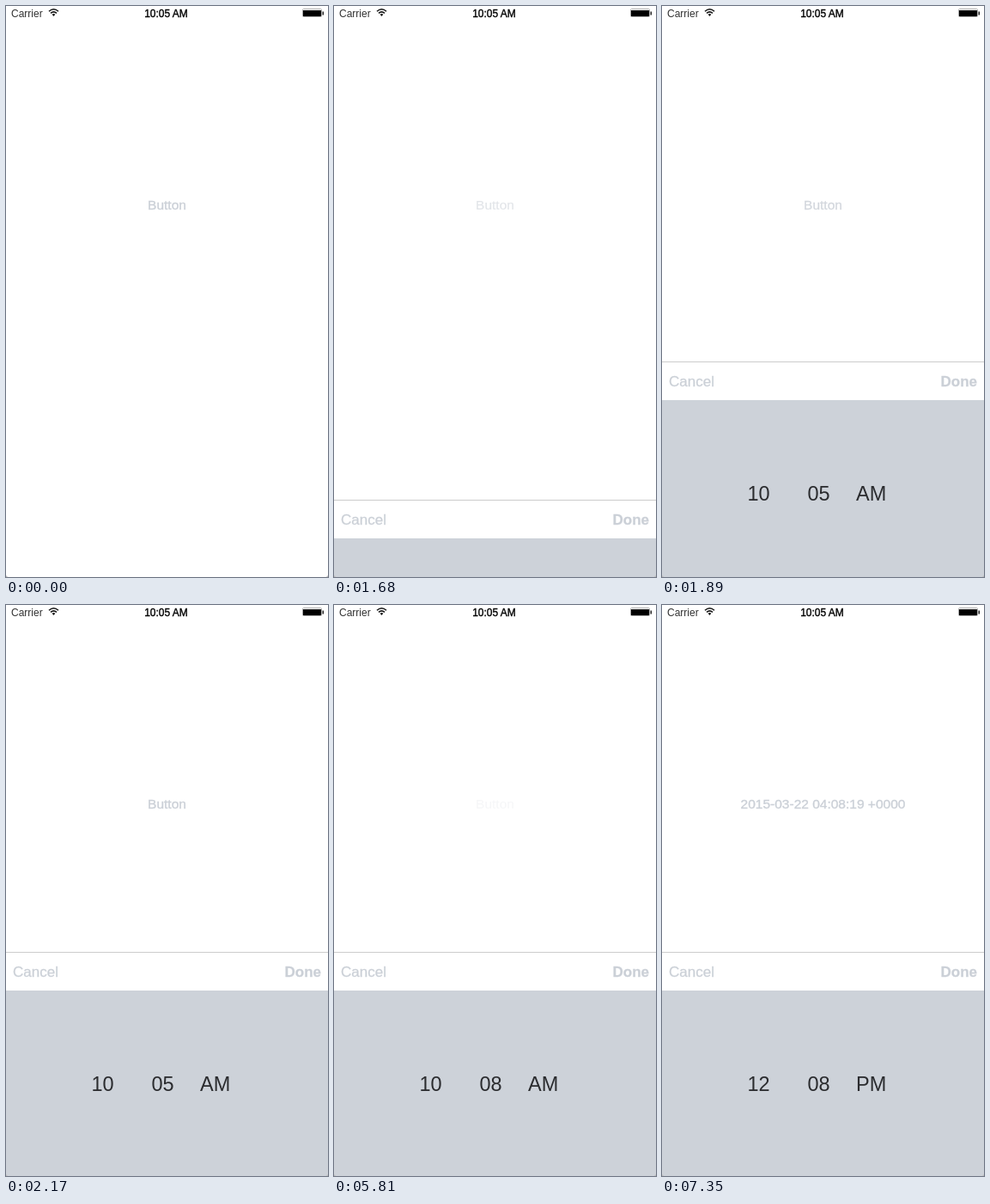
Write an HTML page that moves like this. It is 375x665 px and loops after 8000 ms.

```html
<!DOCTYPE html>
<html lang="en">
<head>
<meta charset="utf-8">
<title>Time picker</title>
<style>
  html, body { margin: 0; width: 100%; height: 100%; overflow: hidden; background: #fff; }
  svg { display: block; width: 375px; height: 665px; }
  text { font-family: "Liberation Sans", Arial, sans-serif; white-space: pre; }
  .tint { fill: #cbd0d7; stroke: #cbd0d7; }
  .bar { font-size: 17px; stroke-width: .3; }
  .wheel { font-size: 23.5px; fill: #2b2c2f; }
</style>
</head>
<body>
<svg viewBox="0 0 375 665">
  <defs>
    <clipPath id="band"><rect y="540" width="375" height="34"/></clipPath>
  </defs>

  <text x="6" y="13" font-size="12" fill="#333">Carrier</text>
  <g fill="none" stroke="#111" stroke-width="1.5">
    <path d="M50 6.2Q55.5 1.4 61 6.2M52 8.4Q55.5 5.4 59 8.4"/>
    <path d="M53.6 9.8Q55.5 8.4 57.4 9.8L55.5 12Z" fill="#111" stroke="none"/>
  </g>
  <text x="186.5" y="13" font-size="12" text-anchor="middle" stroke="#000" stroke-width=".35">10:05 AM</text>
  <rect x="345.5" y="3.5" width="22" height="9" rx="1" fill="#fff" stroke="#aaa"/>
  <rect x="346" y="5" width="21" height="7"/>
  <rect x="368.5" y="6.5" width="1.5" height="4" fill="#222"/>

  <text id="title" class="tint" x="187.5" y="237" font-size="15.5" text-anchor="middle"></text>

  <g id="sheet">
    <rect y="404" width="375" height="45" fill="#fff"/>
    <rect y="404" width="375" height="1" fill="#ccc"/>
    <text class="tint bar" x="8" y="433">Cancel</text>
    <text class="tint bar" x="367" y="433" text-anchor="end" font-weight="700">Done</text>
    <rect y="449" width="375" height="216" fill="#cdd2d9"/>
    <g id="wheels" clip-path="url(#band)"></g>
  </g>
  <path d="M0 663V665H2ZM375 663V665H373Z" fill="#bbb"/>
</svg>
<script>
const LOOP = 8000, ROW = 34, BASE = 566;
const $ = id => document.getElementById(id);
const title = $("title"), sheet = $("sheet");

const part = (t, from, to) => Math.min(1, Math.max(0, (t - from) / (to - from)));
const out = (p, power) => 1 - (1 - p) ** power;

// A column of rows that scrolls behind the selection band
function wheel(x, labels) {
  const g = document.createElementNS("http://www.w3.org/2000/svg", "g");
  g.innerHTML = labels.map((s, i) =>
    `<text class="wheel" x="${x}" y="${BASE + i * ROW}">${s}</text>`).join("");
  $("wheels").append(g);
  return pos => g.setAttribute("transform", `translate(0 ${-pos * ROW})`);
}
const hours = wheel(99.5, ["10", "11", "12"]);
const minutes = wheel(169.5, ["05", "06", "07", "08"]);
const halves = wheel(226, ["AM", "PM"]);

function setTitle(text, ink) {
  if (title.textContent !== text) title.textContent = text;
  title.setAttribute("opacity", ink);
  title.setAttribute("stroke-width", .4 * ink);
}

function drawTitle(t) {
  if (t < 1330) setTitle("Button", 1);
  else if (t < 5500) setTitle("Button", .4 + .6 * out(part(t, 1600, 2170), 2));
  else if (t < 5980) setTitle("Button", 1 - part(t, 5500, 5880));
  else if (t < 7070) setTitle("2015-03-22 02:08:19 +0000", part(t, 5980, 6300) - part(t, 6800, 7070));
  else setTitle("2015-03-22 04:08:19 +0000", part(t, 7070, 7350));
}

function draw(t) {
  drawTitle(t);

  // Critically damped spring
  const x = 18.26 * Math.max(0, t - 1614) / 1000;
  const left = t < 2170 ? (1 + x) * Math.exp(-x) : 0;
  sheet.setAttribute("transform", `translate(0 ${Math.round(261 * left)})`);

  minutes(2 * out(part(t, 4830, 5171), 4) + out(part(t, 5480, 5880), 3));
  hours(1.95 * out(part(t, 5970, 6300), 3) + .05 * out(part(t, 6740, 6930), 2));
  halves(out(part(t, 6830, 7250), 3));
}

function tick() {
  draw(performance.now() % LOOP);
  requestAnimationFrame(tick);
}
tick();
</script>
</body>
</html>
```
